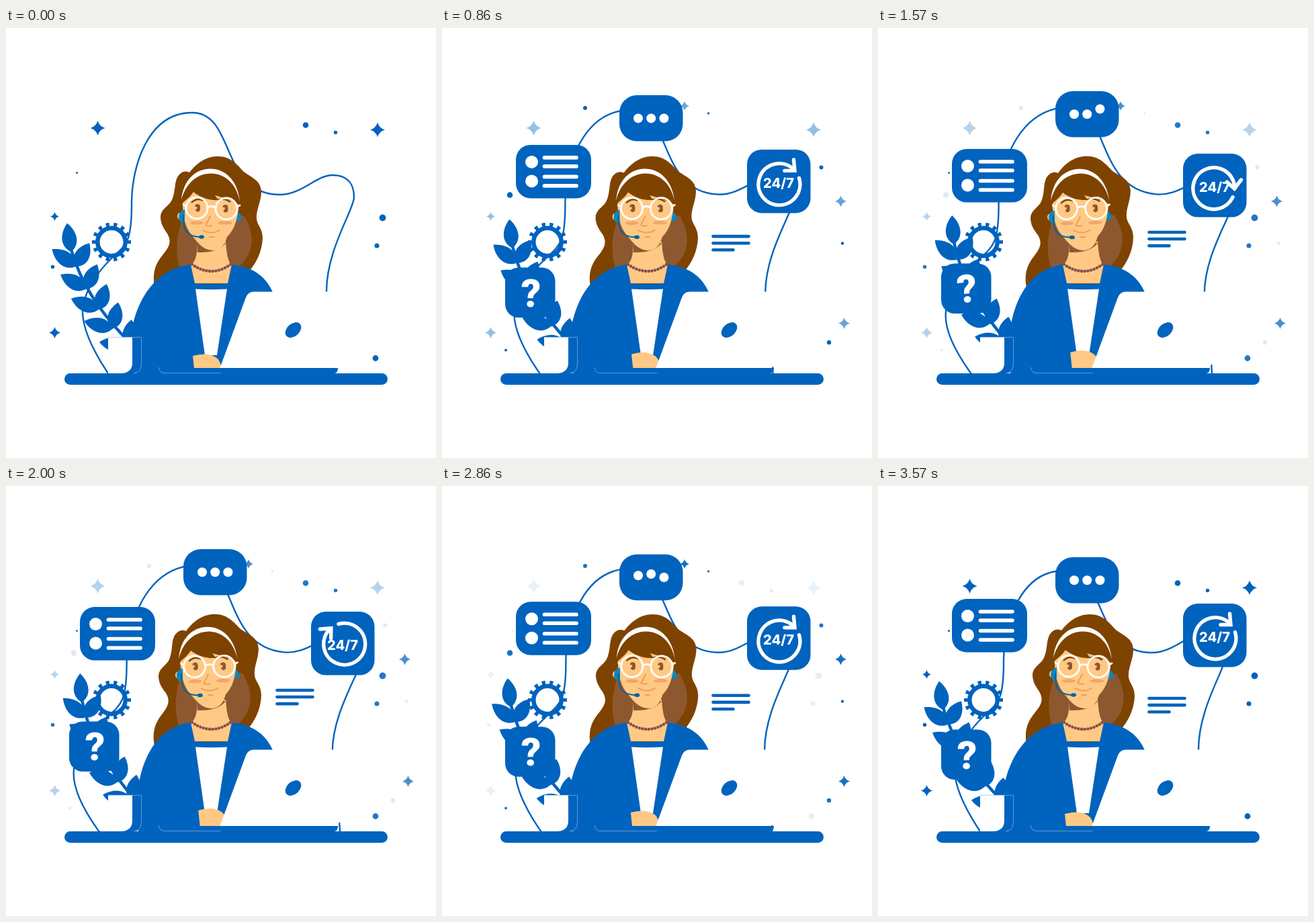
Write an HTML page that moves like this. It is 640 by 640 pixels and loops after 3.64 s.

```html
<!DOCTYPE html>
<html lang="en">
<head>
<meta charset="utf-8">
<title>Support desk</title>
<style>
  html, body { margin: 0; height: 100%; overflow: hidden; background: #fff; }
  svg { display: block; width: 100vw; height: 100vh; fill: #0063be; }
  .line { fill: none; stroke: #0063be; stroke-linecap: round; }
  .pen { fill: none; stroke: #fff; stroke-linecap: round; }
  .white { fill: #fff; }
  .skin { fill: #ffc985; }
  .hair { fill: #7f4300; }
  .shade { fill: #8d5830; }
  .blush { fill: #f3a668; }
  .crease { fill: none; stroke: #eca05c; stroke-width: 2; stroke-linecap: round; }
  .edge { fill: none; stroke: #8db8e2; stroke-width: .7; }
  text { fill: #fff; text-anchor: middle; }
</style>
</head>
<body>
<svg viewBox="0 0 640 640">
  <g id="sparks"></g>
  <path id="cord" class="line" stroke-width="2.4"/>

  <g id="backHair">
    <path class="hair" d="M258 218Q265 211 273 215C283 202 297 191 315 191C336 191 345 205 354 214C364 222 379 226 380 243C380 259 372 270 373 284C374 294 382 298 382 313C381 334 372 350 362 362L340 385H221C217 362 224 349 233 338C243 326 247 318 240 306C234 297 230 291 230 281C231 267 244 266 248 253C253 240 250 226 258 218Z"/>
    <path class="shade" d="M264 280C252 310 252 338 259 358L275 362H338C370 340 372 310 355 280Z"/>
  </g>
  <path id="jacket"/>
  <path class="skin" d="M285 318L284 334Q282 349 275 352L281 380H330L336 352Q329 349 327 318Z"/>
  <path class="shade" d="M284 316L285 334Q316 335 327 320Z"/>
  <path class="white" d="M282 388.500Q306 390 329 388.500L314 487H296Z"/>
  <path d="M277 352Q306 372 334 352" fill="none" stroke="#87504a" stroke-width="4.600" stroke-linecap="round" stroke-dasharray="0 4.700"/>

  <g id="head">
    <ellipse class="skin" cx="259" cy="280" rx="4" ry="5"/>
    <path d="M343 274Q351 276 351 284L344 291Z" fill="#0a86bd"/>
    <circle cx="347" cy="290" r="2.500" class="shade"/>
    <path class="skin" d="M263 258C263 284 268 298 277 309C285 319 293 331 309 331C322 330 326 320 329 311C340 300 345 286 347 258Q305 190 263 258Z"/>
    <path class="hair" d="M261 262C260 236 282 215 305 215C331 215 347 237 348 265C340 256 326 254 311 249L316 256C302 257 289 252 279 244C274 252 267 256 261 262Z"/>
    <path class="white" d="M261 256C264 225 283 209.500 304 209.500C327 209.500 345 228 348 258C343 232 326 216.500 305 216.500C284 216.500 267 232 261 256Z"/>
    <ellipse class="blush" cx="284" cy="290" rx="10" ry="2.800"/>
    <ellipse class="blush" cx="326" cy="290" rx="10.500" ry="2.800"/>
    <path class="crease" d="M304 280Q301 287 297 293Q301 296 306 294M293 301Q307 308 318 301M303 311H310"/>
    <path d="M276 260Q284 252 294 257M315 256Q324 252 334 259" fill="none" stroke="#7f4300" stroke-width="2.400"/>
    <path class="shade" d="M281 266a4 4 0 0 1 8 0v3a3.500 4 0 0 1-7 1q3 0 2-4ZM322.500 267a4 4 0 0 1 8 0v3a3.500 4 0 0 1-7 1q3 0 2-4Z"/>
    <g class="pen" stroke-width="2.800">
      <circle cx="284" cy="268" r="16"/>
      <circle cx="328" cy="269" r="16"/>
      <path d="M300 267Q306 264 312 267M268 265L264 263M344 266L348 264"/>
    </g>
    <path d="M266 270V291Q257 289 257 281Q257 273 266 270Z" fill="#0a86bd"/>
    <path d="M264 278C263 300 268 310 288 311" fill="none" stroke="#00639f" stroke-width="2"/>
    <ellipse cx="291" cy="311" rx="4" ry="2.800" fill="#00639f"/>
  </g>

  <path id="hand" class="skin" d="M278 488Q300 482 312 490Q321 495 322 516H281Z"/>
  <path class="white" d="M318 507L357 401Q360 392.500 369 392.500H530L504 488Q501 500 488 507Z"/>
  <ellipse cx="427.500" cy="449.500" rx="13.500" ry="9.300" transform="rotate(-42 427.500 449.500)"/>
  <path d="M227 506H494Q494 514.200 487 514.200H236Q228 514 227 506Z"/>
  <path class="edge" d="M227.500 505Q228 513.600 236 513.600H320"/>

  <g fill="none" stroke="#0063be">
    <circle cx="157" cy="318.500" r="20.700" stroke-width="6.400"/>
    <circle cx="157" cy="318.500" r="26" stroke-width="6" pathLength="140" stroke-dasharray="4.400 5.600" stroke-dashoffset="2.200"/>
  </g>

  <g id="list">
    <rect x="110" y="168" width="112" height="79.500" rx="22"/>
    <circle class="white" cx="133.500" cy="193.500" r="9.500"/>
    <circle class="white" cx="133.500" cy="222" r="9.500"/>
    <path class="pen" stroke-width="5.600" d="M152.500 187H200m-47.500 13H200m-47.500 15.500H200m-47.500 13.500H200"/>
  </g>
  <g id="chat">
    <rect x="264" y="106" width="94.500" height="68.500" rx="26"/>
    <g id="dots" class="white"></g>
  </g>
  <g id="hours">
    <rect x="454" y="175" width="94.500" height="94.500" rx="22"/>
    <g id="arrow" class="pen" stroke-width="5.400">
      <path d="M531.500 217.500A31 31 0 1 1 523 204"/>
      <path d="M523.500 190L525 206.500L510 206.500"/>
    </g>
    <text x="501" y="232" font-size="20" font-weight="800" font-family="Inter, sans-serif">24/7</text>
  </g>

  <g id="plant"><path class="line" stroke-width="4.500" d="M97 330C110 375 135 420 190 474"/></g>
  <path class="white" d="M152 460H201V500Q201 514 188 514H152Z"/>
  <path d="M188 460H201.500V500Q201.500 514 190 514H172Q188 513 188 498Z"/>
  <path class="edge" d="M152 460.300H201.500V500Q201 513.500 190 513.600"/>

  <g id="ask">
    <rect x="94" y="362.500" width="74.500" height="74.500" rx="20"/>
    <text id="mark" x="132.500" y="420.500" font-size="58" font-weight="900" font-family="Roboto, sans-serif">?</text>
  </g>
  <g id="notes" class="line" stroke-width="4.600"></g>
  <rect x="87" y="514" width="481" height="17" rx="8.500"/>
</svg>
<script>
const LOOP = 3640, SPAN = 3570;
const $ = id => document.getElementById(id);
const clamp = v => Math.min(1, Math.max(0, v));
const wave = v => (1 - Math.cos(2 * Math.PI * v)) / 2;
const ease = v => wave(clamp(v) / 2);
const place = (id, value) => $(id).setAttribute('transform', value);

function add(parent, tag, attrs) {
  const node = document.createElementNS('http://www.w3.org/2000/svg', tag);
  for (const key in attrs) node.setAttribute(key, attrs[key]);
  $(parent).append(node);
  return node;
}

// Twinkles: each spot is x, y, radius
function star([x, y, r]) {
  const k = r * .22;
  return `M${x} ${y - r}Q${x + k} ${y - k} ${x + r} ${y}Q${x + k} ${y + k} ${x} ${y + r}` +
    `Q${x - k} ${y + k} ${x - r} ${y}Q${x - k} ${y - k} ${x} ${y - r}Z`;
}
const dot = ([x, y, r]) => `M${x - r} ${y}a${r} ${r} 0 1 0 ${2 * r} 0a${r} ${r} 0 1 0 ${-2 * r} 0Z`;
const spark = (shape, ...spots) => add('sparks', 'path', { d: spots.map(shape).join('') });
const starsA = spark(star, [136.5, 149, 11], [553, 151.5, 11], [72.5, 280.5, 6.5], [72.5, 453.5, 8.5]);
const starsB = spark(star, [361, 116, 7], [593.5, 258, 8.5], [598.5, 439.5, 8.5]);
const dotsA = spark(dot, [446, 144.5, 4.3], [490.5, 155.5, 2.7], [560.5, 282.5, 4.9], [552, 324, 3.5],
  [550, 491.5, 4.4], [105.5, 215.5, 1.6], [69.5, 355.5, 2.8]);
const dotsB = spark(dot, [213, 119, 3], [396.5, 127, 1.7], [564.5, 207.5, 3], [101, 248.5, 4.3],
  [596, 320.5, 2.3], [576, 468, 3.2], [95, 479.5, 2]);

// Leaves grow in pairs down the stem
const leaf = (x, y, angle, size) => add('plant', 'path', {
  d: 'M0 0C9 -15 28 -14 43 0C28 14 9 15 0 0Z',
  transform: `translate(${x} ${y}) rotate(${angle}) scale(${size} 1)`
});
leaf(97, 333, -98, 1);
for (let k = 0; k < 5; k++) {
  const x = 104 + 14 * k + 1.4 * k * k, y = 355 + 34.5 * k - 1.2 * k * k;
  leaf(x, y, -144 - 7 * k, 1.02);
  leaf(x, y, -60 - 6 * k, .93);
}

const dots = [0, 1, 2].map(i => add('dots', 'circle', { cx: 292 + 19.2 * i, r: 7 }));
const notes = [53, 53, 30].map(() => add('notes', 'path', {}));

// The cord sways by bending the plane it lies in
const CORD = 'M152 514C128 478 114 448 114 422S135 364 157 343S187 320 187 262S212 126 277 126S318 248 408 248' +
  'C440 248 462 219 486 219S518 234 518 252S477 330 477 392S488 475 488 514';
const bend = p => CORD.replace(/(\d+) (\d+)/g, (_, x, y) => {
  const dx = (x - 277) * (x < 277 ? .085 : .045);
  const dy = 7 - 17 * Math.exp(-(((x - 310) / 110) ** 2));
  return `${+x + dx * p} ${+y + dy * p}`;
});

function pop(id, u, start, x, y, dy) {
  place(id, `translate(${x} ${y + dy}) scale(${ease((u - start) / .16)}) translate(${-x} ${-y})`);
}

function draw() {
  const u = Math.min(1, performance.now() % LOOP / SPAN);
  const p = wave(u), lift = 12.5 * p;

  starsB.style.opacity = wave(3 * u);
  starsA.style.opacity = 1 - wave(3 * u);
  dotsB.style.opacity = wave(2 * u);
  dotsA.style.opacity = 1 - wave(2 * u);

  $('cord').setAttribute('d', bend(p));
  $('jacket').setAttribute('d', `M${194 + 3 * p} 514L${187 + 10 * p} 450C${195 + 8 * p} 405 ${222 + 3 * p} 358 275 352` +
    'L281 380Q306 382 330 380L336 352C365 355 386 368 397 393L340 514Z');
  place('plant', `rotate(${4.7 * p} 245 528)`);
  place('head', `rotate(${-1.8 * p} 307 380)`);
  place('backHair', `rotate(${-1.8 * p} 307 380)`);
  place('hand', `translate(${8.5 * p} ${-5.5 * p})`);

  pop('hours', u, .023, 454, 269.5, lift);
  pop('list', u, .045, 222, 247.5, lift);
  pop('chat', u, .05, 311.3, 174.5, -lift);
  pop('ask', u, .066, 168.5, 362.5, -lift);

  place('arrow', `rotate(${360 * ease((u - .38) / .27)} 501 224)`);
  place('mark', `rotate(${8 * Math.sin(2 * Math.PI * clamp((u - .3) / .16))} 132 400)`);
  dots.forEach((circle, i) => {
    const hop = start => Math.sin(Math.PI * clamp((u - start - .055 * i) / .08));
    circle.setAttribute('cy', 140.3 - 8.3 * (hop(.3) + hop(.73)));
  });

  place('notes', `translate(0 ${-lift})`);
  notes.forEach((line, i) => {
    const grown = ease((u - .02 - .02 * i) / .09);
    line.setAttribute('d', grown ? `M403.5 ${316 + 10.1 * i}h${(i < 2 ? 53 : 30) * grown}` : '');
  });
  requestAnimationFrame(draw);
}
draw();
</script>
</body>
</html>
```
